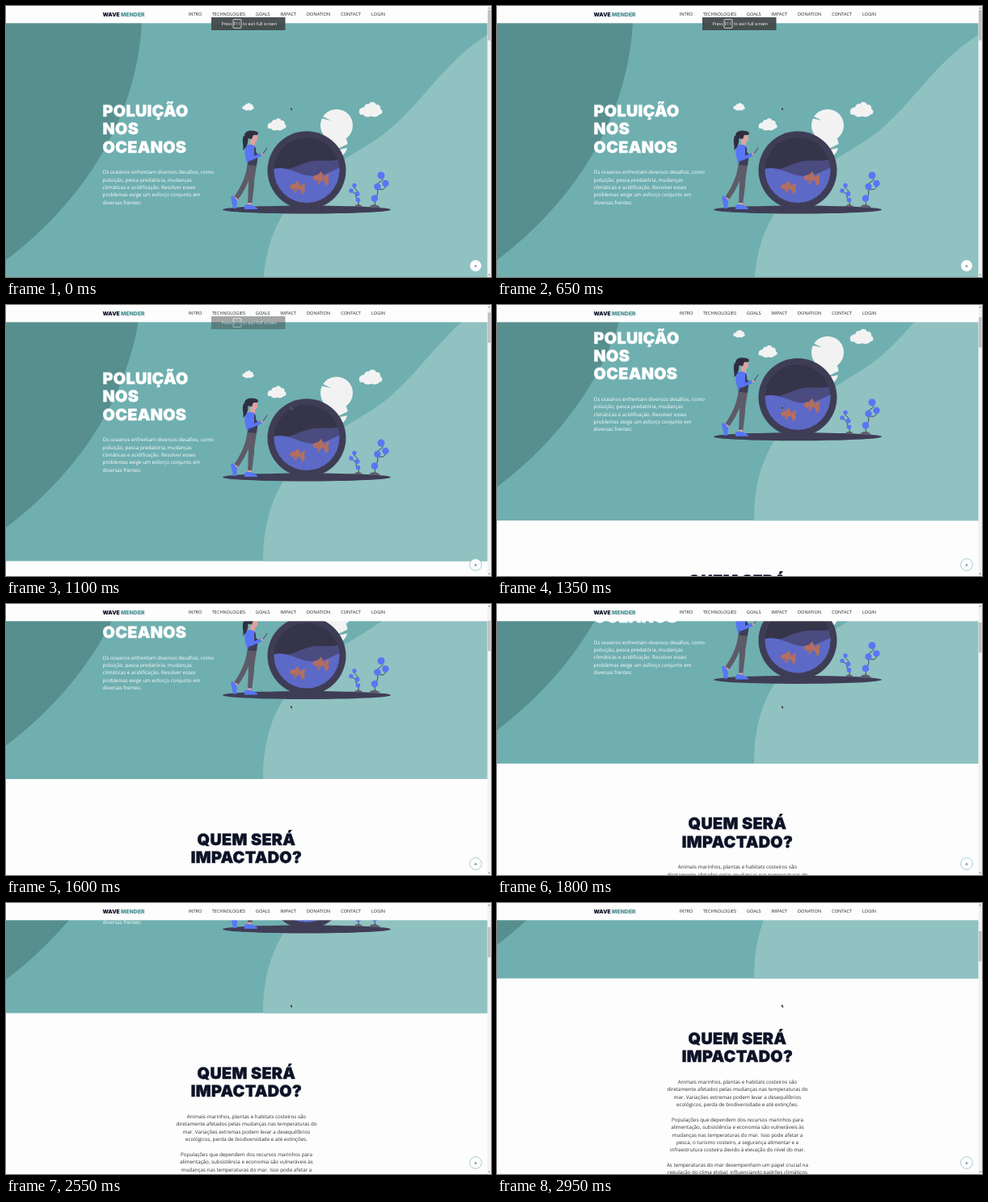
Recreate the animation shown at these times as an HTML page. Size 600 px wide and 336 px high, loop 3 s.

```html
<!DOCTYPE html>
<html lang="pt">
<head>
<meta charset="utf-8">
<title>Poluição nos oceanos</title>
<style>
  html, body { margin: 0; width: 100%; height: 100%; overflow: hidden; background: #fdfdfd; }
  svg { display: block; width: 600px; height: 336px; text-rendering: geometricPrecision; }
  text { font-family: "Open Sans", "Noto Sans", sans-serif; font-size: 6.25px; }
  .title, .brand { font-family: Inter, sans-serif; font-weight: 900; fill: #0c1226; }
  .title { font-size: 19.8px; letter-spacing: .3px; stroke: #0c1226; stroke-width: .4px; }
  .nav .brand { font-size: 6.8px; fill: #0c1226; }
  .mid { text-anchor: middle; }
  .nav text { font-size: 5.62px; fill: #262626; }
  .light text { fill: #fff; }
  .light .title { stroke: #fff; }
  .note text { font-size: 5.3px; fill: #fff; }
  .ink { fill: #3f3d56; }
  .hair { fill: #2f2e41; }
  .blue { fill: #5876f5; }
  .skin { fill: #dca3a0; }
  .teal { fill: #6fafb0; }
  .line { fill: none; stroke: #3f3d56; stroke-linecap: round; }
</style>
</head>
<body>
<svg viewBox="0 0 600 336">
  <defs>
    <path id="cloud" d="M-14 4C-15-1-11-3-8-3C-7-7-4-8-2-7C0-11 6-10 7-6C11-7 13-3 12-1C16 1 15 6 11 6C9 9 4 10 1 8C-3 10-8 9-9 6C-11 7-14 6-14 4Z"/>
    <path id="fish" d="M-10-1C-7-6 0-6 5-2C7-5 9-6 11-5C10-2 9 0 10 2C11 5 9 8 6 9C6 5 5 3 3 2C-2 4-7 4-10-1ZM-4-4L1-9L4-3ZM-4 2L-3 8L1 3Z"/>
    <clipPath id="glass"><circle cx="372" cy="203.5" r="40.5"/></clipPath>
  </defs>

  <g id="page">
    <rect class="teal" width="600" height="356.5"/>
    <path fill="#578f8f" d="M0 0H168V21C162 130 105 235 0 315Z"/>
    <path fill="#90c2c1" d="M600 33L595 36C545 68 520 112 480 148C430 197 318 212 318 356.5H600Z"/>
    <g id="intro" class="light"></g>

    <g fill="#f2f2f2">
      <use href="#cloud" transform="translate(299.5 125) scale(.5)"/>
      <use href="#cloud" transform="translate(335 147) scale(.8)"/>
      <use href="#cloud" transform="translate(451 128.5)"/>
      <circle cx="405" cy="172" r="17.5"/>
      <circle cx="409" cy="148" r="20"/>
    </g>
    <path class="teal" d="M388 135L402 142L389 139ZM425 170L404 180L422 176Z"/>

    <ellipse class="ink" cx="372" cy="252.5" rx="104" ry="5"/>
    <circle class="ink" cx="372" cy="203.8" r="48.5"/>
    <circle cx="372" cy="203.5" r="40.5" fill="#363449"/>
    <g clip-path="url(#glass)">
      <path fill="#4a4b80" d="M331 203C352 206 362 195 380 192C394 190 404 194 413 189V245H331Z"/>
      <path fill="#5c69c6" d="M331 202C346 198 358 207 372 210C388 213 402 206 413 200V245H331Z"/>
    </g>
    <g fill="#b26e61">
      <use href="#fish" transform="translate(389 214)"/>
      <use href="#fish" transform="translate(360 225) scale(.95)"/>
    </g>

    <!-- woman with phone -->
    <path fill="#5d5b68" d="M299 193L310 194C310 204 307 211 307 222L304 247H299L300 217C297 224 293 232 287 240L282 237C290 225 297 213 299 193Z"/>
    <path class="skin" d="M282 236L287 239L284 245L280 243ZM299 244H304V248H299ZM302 166H308V174H302Z"/>
    <path class="blue" d="M280 235C283 237 286 240 286 243L285 251H281L278 237ZM295 247C299 245 305 246 308 249C312 250 312 252 309 252H295Z"/>
    <path class="blue" d="M297 174C300 171 306 171 309 175L310 194L298 195C297 188 293 181 297 174Z"/>
    <path class="ink" d="M307 174L309 177V181L312 184L310 198L299 197L301 190L307 187Z"/>
    <path class="skin" d="M303 158H311V165C311 169 306 170 303 168Z"/>
    <path class="hair" d="M295 160C296 154 306 153 312 157L311 160H306L304 165L299 164ZM298 160C301 166 299 175 293 179C295 174 291 168 294 161Z"/>
    <path d="M299 177L302 190L316 184" fill="none" stroke="#5876f5" stroke-width="4" stroke-linejoin="round"/>
    <circle class="skin" cx="317" cy="183.5" r="1.6"/>
    <path class="line" d="M318 183L323 176"/>

    <!-- sea plants -->
    <path class="line" d="M436 247C438 239 430 239 434 233S427 227 431 222M427 229L433 234M457 247C453 239 463 235 459 226S472 219 464 210M459 226C466 230 471 226 470 220"/>
    <path fill="#605e70" d="M431 249C432 245 439 245 441 249ZM449 250C450 246 459 244 463 250Z"/>
    <g id="balls" class="blue"></g>

    <g id="impact" class="mid" fill="#303030"></g>
  </g>

  <g class="nav">
    <rect width="600" height="21.3" fill="#fdfdfd"/>
    <text class="brand" x="119.6" y="12.6">WAVE <tspan fill="#4f9496">MENDER</tspan></text>
    <g id="menu"></g>
  </g>

  <g class="note" id="note">
    <rect x="254" y="14" width="91.5" height="16" fill="#43494a" fill-opacity=".95"/>
    <rect x="281" y="16.7" width="10" height="10.6" rx=".8" fill="none" stroke="#fff" stroke-width=".7"/>
    <text x="266.4" y="24">Press</text>
    <text class="mid" x="286" y="24">F11</text>
    <text x="293" y="24">to exit full screen</text>
  </g>

  <circle cx="581" cy="322" r="7.4" fill="#fdfdfd" stroke="#6fafb0" stroke-width=".6"/>
  <text class="mid" x="581" y="323.6" style="font-size:4.4px;font-weight:600" fill="#2b5b66">A</text>

  <rect x="595.5" width="4.5" height="336" fill="#f1f1f1"/>
  <path fill="#555" d="M596.7 3.3L597.8 1.8L598.9 3.3ZM596.7 332.7L597.8 334.2L598.9 332.7Z"/>
  <rect id="thumb" x="596" y="5" width="3.6" height="37.5" fill="#c1c1c1"/>
  <path d="M352 125.5V129.6L352.9 128.8L353.6 130.2L354.2 129.9L353.6 128.5H354.8Z" fill="#111" stroke="#fff" stroke-width=".25"/>
</svg>

<script>
const $ = id => document.getElementById(id);

function add(id, tag, attrs, content = '') {
  const el = document.createElementNS('http://www.w3.org/2000/svg', tag);
  for (const key in attrs) el.setAttribute(key, attrs[key]);
  el.textContent = content;
  $(id).append(el);
}

function lines(id, text, x, y, step, cls = '') {
  text.split('\n').forEach((line, i) => add(id, 'text', { x, y: y + i * step, class: cls }, line));
}

lines('intro', 'POLUIÇÃO\nNOS\nOCEANOS', 119.5, 137, 22.35, 'title');
lines('intro', `Os oceanos enfrentam diversos desafios, como
poluição, pesca predatória, mudanças
climáticas e acidificação. Resolver esses
problemas exige um esforço conjunto em
diversas frentes:`, 119.6, 208.2, 9.36);

lines('impact', 'QUEM SERÁ\nIMPACTADO?', 297.5, 438, 22.35, 'title');
lines('impact', `Animais marinhos, plantas e habitats costeiros são
diretamente afetados pelas mudanças nas temperaturas do
mar. Variações extremas podem levar a desequilíbrios
ecológicos, perda de biodiversidade e até extinções.

Populações que dependem dos recursos marinhos para
alimentação, subsistência e economia são vulneráveis às
mudanças nas temperaturas do mar. Isso pode afetar a
pesca, o turismo costeiro, a segurança alimentar e a
infraestrutura costeira devido à elevação do nível do mar.

As temperaturas do mar desempenham um papel crucial na
regulação do clima global, influenciando padrões climáticos`, 297.5, 487.1, 9.35);

Object.entries({ INTRO: 225.6, TECHNOLOGIES: 254.7, GOALS: 308.8, IMPACT: 339.3, DONATION: 372, CONTACT: 414.3, LOGIN: 452 })
  .forEach(([label, x]) => add('menu', 'text', { x, y: 12.4 }, label));

[[464, 210, 4.5], [469.5, 220, 4.2], [459.5, 224, 4.2], [456, 238.5, 4.3],
 [431, 222.5, 2.7], [427, 229, 2.7], [434.5, 233, 3], [435.5, 240.5, 2.8]]
  .forEach(([cx, cy, r]) => add('balls', 'circle', { cx, cy, r }));

// [time, scroll offset]
const stops = [[0, 0], [900, 0], [1100, 39], [1600, 139.5], [2100, 187.3], [2550, 220], [2950, 263], [3000, 268]];

function scrollAt(t) {
  const i = stops.findIndex(s => s[0] > t);
  const [t0, y0] = stops[i - 1], [t1, y1] = stops[i];
  return y0 + (y1 - y0) * (t - t0) / (t1 - t0);
}

function draw(now) {
  const t = Math.floor(now % 3000 / 50) * 50;
  const y = scrollAt(t);
  $('page').setAttribute('transform', `translate(0 ${-y})`);
  $('thumb').setAttribute('y', 5 + y * 0.113);
  $('note').setAttribute('opacity', Math.max(0, Math.min(1, (1200 - t) / 200)));
}

const start = performance.now();
function tick() {
  draw(performance.now() - start);
  requestAnimationFrame(tick);
}
tick();
</script>
</body>
</html>
```
